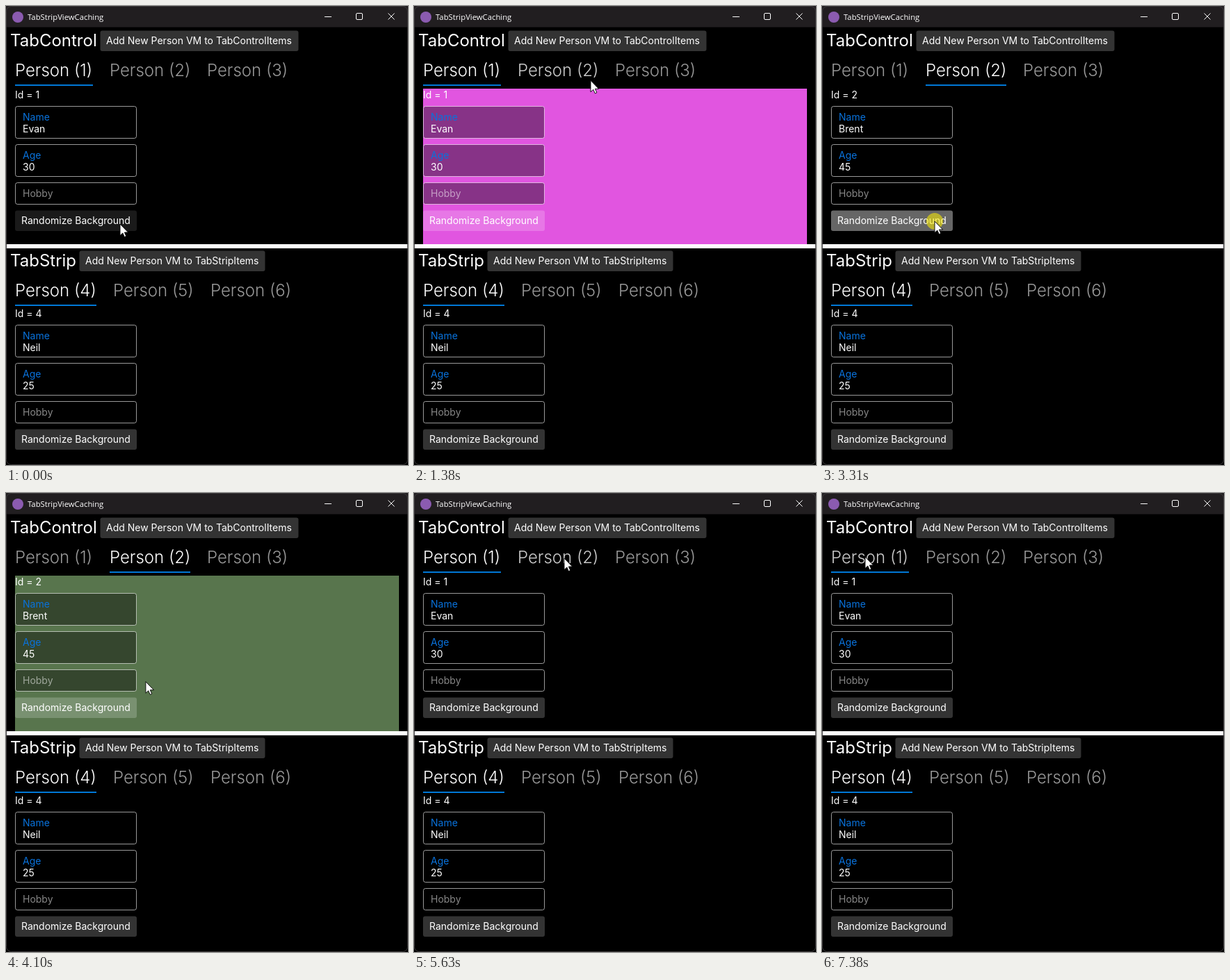
Recreate the animation shown at these times as an HTML page. Size 578 by 661 pixels, loop 8 s.

```html
<!DOCTYPE html>
<html lang="en">
<head>
<meta charset="utf-8">
<title>TabStripViewCaching</title>
<style>
  html, body { margin: 0; width: 100%; height: 100%; overflow: hidden; background: #000; }
  svg { display: block; width: 100vw; height: 100vh; }
  text { font: 14px Inter, sans-serif; font-optical-sizing: none; fill: #fff; white-space: pre; }
  .caption { font: 11.3px "Open Sans", sans-serif; }
  .heading { font-size: 24px; }
  .tab { font-size: 24px; font-weight: 300; }
  .label { fill: #0972dc; }
  .hint { fill: #fff; fill-opacity: .53; }
  .field { fill: #000; fill-opacity: .4; stroke: #fff; stroke-opacity: .6; }
  .glyph { fill: none; stroke: #fff; }
</style>
</head>
<body>
<svg viewBox="0 0 578 661">
  <rect width="578" height="661"/>
  <rect width="578" height="30.5" fill="#211e20"/>
  <circle cx="17" cy="16" r="8" fill="#8b5bb0"/>
  <text class="caption" x="31" y="20">TabStripViewCaching</text>
  <path class="glyph" d="M458 15.5h10M549.5 10.5l9 9m0-9l-9 9"/>
  <rect class="glyph" x="503.5" y="10.5" width="9" height="9" rx="1.5"/>
  <g id="top"></g>
  <rect y="343" width="578" height="6" fill="#fff"/>
  <g id="bottom"></g>
  <rect x=".5" y=".5" width="577" height="660" rx="7" fill="none" stroke="#3c3a3b"/>
  <circle id="click" r="12" fill="#fff000" fill-opacity=".55"/>
  <path id="cursor" d="M0 0V16.5L3.8 13 6.3 18.6 8.8 17.5 6.4 12H11.6Z" fill="#fff" stroke="#000" stroke-width=".9"/>
</svg>
<script>
const LOOP = 8000;
const $ = id => document.getElementById(id);

const people = {
  1: { name: 'Evan', age: 30 },
  2: { name: 'Brent', age: 45 },
  4: { name: 'Neil', age: 25 },
};

// Pointer keys: time, x, y. Equal neighbours are rests.
const path = [
  [0, 164, 314], [640, 164, 314], [1240, 261, 144], [1490, 245, 94],
  [2220, 245, 94], [2640, 214, 194], [3020, 160, 303], [3100, 160, 303],
  [3270, 162, 310], [3910, 162, 310], [4100, 201, 272], [4680, 80, 95],
  [5240, 80, 95], [5630, 216, 94], [6290, 216, 94], [6960, 62, 92], [8000, 62, 92],
];
const clicks = [[470, 620], [1740, 1960], [3310, 3460], [4880, 5090], [6090, 6300], [7210, 7380]];
const buttonClicks = [clicks[0], clicks[2]];
const selections = [[0, 1], [1780, 2], [4920, 1], [6090, 2], [7210, 1]];
const fills = [[0, 'none'], [620, '#e155e0'], [1780, 'none'], [3460, '#58754d'], [4920, 'none']];

const stepAt = (steps, t) => steps.findLast(([start]) => t >= start)[1];
const within = (v, from, to) => v >= from && v < to;

function velocity(i, axis) {
  const a = path[i - 1], p = path[i], b = path[i + 1];
  const resting = q => q[1] === p[1] && q[2] === p[2];
  if (!a || !b || resting(a) || resting(b)) return 0;
  return (b[axis] - a[axis]) / (b[0] - a[0]);
}

function pointerAt(t) {
  const i = Math.max(1, path.findIndex(key => key[0] > t));
  const a = path[i - 1], b = path[i];
  const span = b[0] - a[0], u = (t - a[0]) / span;
  const blend = u * u * (3 - 2 * u);
  return [1, 2].map(axis =>
    a[axis] + (b[axis] - a[axis]) * blend
    + span * u * (1 - u) * ((1 - u) * velocity(i - 1, axis) - u * velocity(i, axis)));
}

const text = (x, y, content, cls = '', extra = '') =>
  `<text class="${cls}" x="${x}" y="${y}" ${extra}>${content}</text>`;

const button = (x, y, width, content, alpha = .2) =>
  `<rect x="${x}" y="${y}" width="${width}" height="29.5" rx="3" fill="#fff" fill-opacity="${alpha}"/>`
  + text(x + 9 - (x > 100 ? .5 : 0), y + 19.5, content);

const field = (y, height) =>
  `<rect class="field" x="13.5" y="${y + .5}" width="174" height="${height - 1}" rx="3"/>`;

const labelled = (y, label, value) =>
  field(y, 47) + text(24, y + 21, label, 'label') + text(24, y + 38, value);

function header(title, addX, addWidth, tabs, selected, hovered) {
  return text(6, 58, title, 'heading')
    + button(addX, 35.5, addWidth, `Add New Person VM to ${title}Items`)
    + tabs.map(([id, x, width]) => {
      const alpha = id === hovered ? .8 : id === selected ? 1 : .6;
      return text(x, 101, `Person (${id})`, 'tab', `fill-opacity="${alpha}"`)
        + (id === selected ? `<rect x="${x}" y="113" width="${width}" height="2" fill="#0078d7"/>` : '');
    }).join('');
}

function form(id, fill = 'none', alpha = .2, scale = 1) {
  const { name, age } = people[id];
  return `<rect x="13" y="119" width="552" height="224" fill="${fill}"/>`
    + text(13, 133, `Id = ${id}`)
    + labelled(144, 'Name', name) + labelled(199, 'Age', age)
    + field(254, 32) + text(24, 275, 'Hobby', 'hint')
    + `<g transform="translate(100.5 309) scale(${scale}) translate(-100.5 -309)">`
    + button(13, 294.5, 175, 'Randomize Background', alpha) + '</g>';
}

const topTabs = [[1, 13, 112], [2, 149, 116], [3, 289, 116]];
const bottomTabs = [[4, 13, 117], [5, 154, 115], [6, 294, 115]];

$('bottom').innerHTML =
  `<g transform="translate(0 317)">${header('TabStrip', 105.5, 267, bottomTabs, 4)}</g>`
  + `<g transform="translate(0 315)">${form(4)}</g>`;

let shown;
function render(t) {
  const [x, y] = pointerAt(t);
  const tab = topTabs.find(([, left, width]) => within(x, left - 12, left + width + 12));
  const hovered = within(y, 69, 117) && tab ? tab[0] : 0;
  const overButton = within(x, 13, 188) && within(y, 294, 324);
  const pressed = buttonClicks.some(([down, up]) => within(t, down, up));
  const shrunk = buttonClicks.some(([down, up]) => within(t, down + 100, up + 40));
  const selected = stepAt(selections, t);

  const markup = header('TabControl', 135.5, 285, topTabs, selected, hovered)
    + form(selected, stepAt(fills, t), pressed ? .4 : overButton ? .1 : .2, shrunk ? .98 : 1);
  if (markup !== shown) $('top').innerHTML = shown = markup;

  const place = `translate(${x.toFixed(1)} ${y.toFixed(1)})`;
  $('cursor').setAttribute('transform', place);
  $('click').setAttribute('transform', place);
  $('click').style.display = clicks.some(([from, to]) => within(t, from, to)) ? '' : 'none';
}

const start = performance.now();
function tick() {
  render((performance.now() - start) % LOOP);
  requestAnimationFrame(tick);
}
tick();
</script>
</body>
</html>
```
